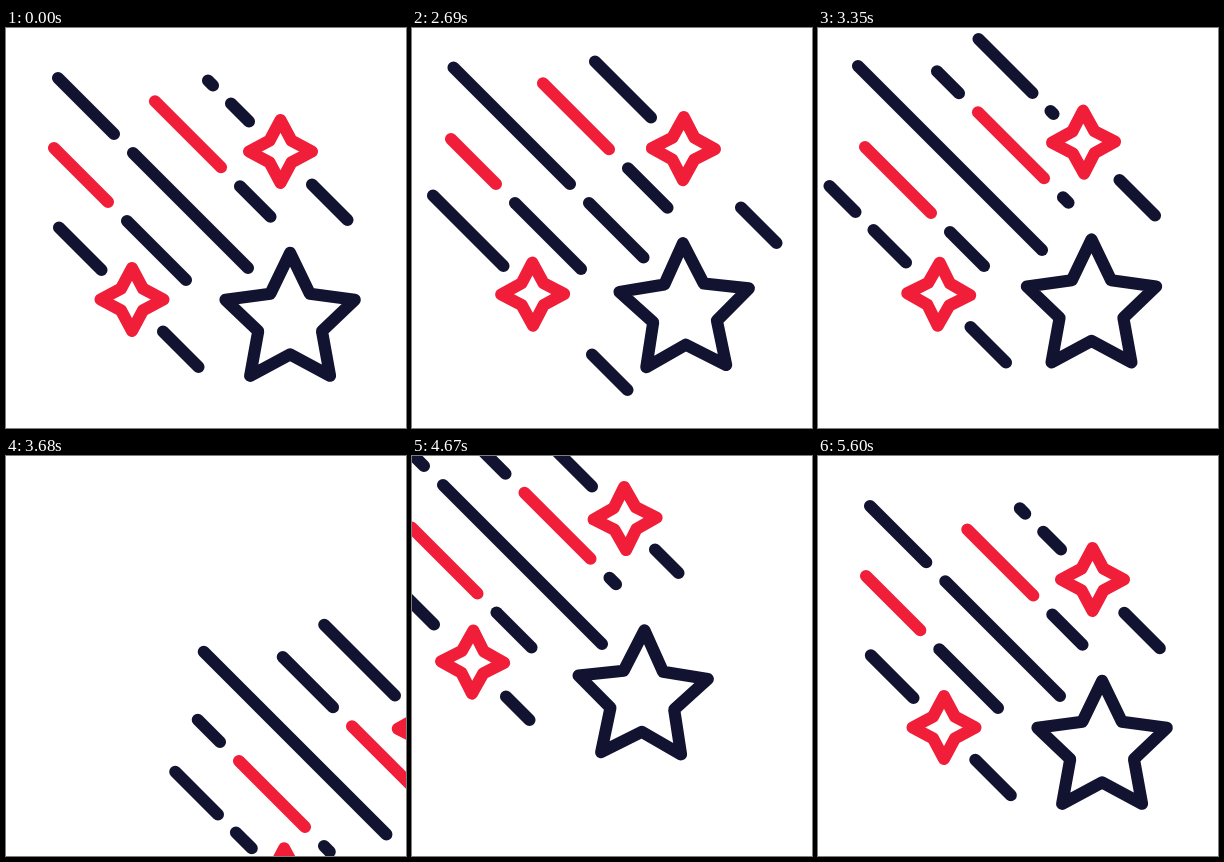
Write an HTML page that moves like this. It is 400 px wide and 400 px high and loops after 5630 ms.

```html
<!DOCTYPE html>
<html lang="en">
<head>
<meta charset="utf-8">
<title>Shooting stars</title>
<style>
  html, body { margin: 0; width: 100%; height: 100%; overflow: hidden; background: #fff; }
  svg { display: block; width: 100vw; height: 100vh; }
  path { fill: none; stroke-width: 12.1; stroke-linecap: round; stroke-linejoin: round; }
</style>
</head>
<body>
<svg viewBox="0 0 400 400" id="stage"></svg>
<script>
const LOOP = 5630, START = 2030, STEP = 30;
const DARK = '#121331', RED = '#f01e38';
const stage = document.getElementById('stage');

function addPath(color, d = '') {
  const el = document.createElementNS('http://www.w3.org/2000/svg', 'path');
  el.setAttribute('stroke', color);
  el.setAttribute('d', d);
  stage.appendChild(el);
  return el;
}

// Closed star around the origin, given as alternating radii
function starPath(points, outer, inner) {
  let d = '';
  for (let i = 0; i < points * 2; i++) {
    const a = i * Math.PI / points - Math.PI / 2;
    const r = i % 2 ? inner : outer;
    d += (i ? 'L' : 'M') + (r * Math.cos(a)).toFixed(2) + ' ' + (r * Math.sin(a)).toFixed(2);
  }
  return d + 'Z';
}

// Smooth monotone curve through [time, value] keys, flat at both ends
function curve(keys, t) {
  const n = keys.length - 1;
  if (t <= keys[0][0]) return keys[0][1];
  if (t >= keys[n][0]) return keys[n][1];
  const slope = i => (keys[i + 1][1] - keys[i][1]) / (keys[i + 1][0] - keys[i][0]);
  const tangent = i => {
    if (i === 0 || i === n) return 0;
    const a = slope(i - 1), b = slope(i);
    return a * b <= 0 ? 0 : 2 * a * b / (a + b);
  };
  let i = 0;
  while (t > keys[i + 1][0]) i++;
  const h = keys[i + 1][0] - keys[i][0], u = (t - keys[i][0]) / h;
  const u2 = u * u, u3 = u2 * u;
  return keys[i][1] * (2 * u3 - 3 * u2 + 1) + keys[i + 1][1] * (3 * u2 - 2 * u3)
    + h * (tangent(i) * (u3 - 2 * u2 + u) + tangent(i + 1) * (u3 - u2));
}

// Diagonal travel: drift back, shoot out, return from the top left corner
function travel(mid, back, entry, t) {
  const OUT = 3350, JUMP = 3800;
  if (t < START) return 0;
  if (t < OUT) return curve([[START, 0], [2690, mid], [OUT, back]], t);
  if (t < JUMP) return back + 400 * ((t - OUT) / (JUMP - OUT)) ** 3;
  return -entry * ((LOOP - t) / 960) ** 3;
}

const flows = {
  mid: [[START, 0], [2690, 148.5], [3350, 499], [4160, 973], [4670, 1089], [LOOP, 1254]],
  near: [[START, 0], [2690, 179], [3350, 485], [4670, 996], [LOOP, 1190]],
  tail: [[START, 0], [2690, 38], [3350, 401], [4670, 1089], [LOOP, 1248]],
  front: [[START, 0], [2690, 77], [3350, 413], [4670, 1052], [LOOP, 1248]]
};
const stretch = [[START, 0], [2690, 28], [3350, 34], [4800, 34], [LOOP, 0]];

const groups = {
  main: t => travel(-10.5, -12, 52, t),
  near: t => travel(-9, -14, 60.5, t),
  far: t => travel(-4, -7.5, 63, t)
};

// A lane lies on x - y = c and shows dashes between from and to
const lanes = [
  { c: 149.5, group: 'far', flow: 'tail', from: 202, to: 243, first: 225, dash: 86, period: 104, grow: true },
  { c: 149.5, group: 'far', flow: 'front', from: 306, to: 397, first: 306, dash: 35.5, period: 104 },
  { c: 75.8, group: 'near', flow: 'near', from: 133, to: 264.5, first: 149, dash: 66, period: 170, red: true },
  { c: 75.8, group: 'near', flow: 'near', from: 133, to: 264.5, first: 234, dash: 66, period: 170 },
  { c: 2, group: 'main', flow: 'mid', from: 52, to: 242, first: 127, dash: 190, period: 209 },
  { c: -72, group: 'near', flow: 'near', from: 48, to: 180, first: 36, dash: 66, period: 170, red: true },
  { c: -72, group: 'near', flow: 'near', from: 48, to: 180, first: 121, dash: 66, period: 170 },
  { c: -146.5, group: 'far', flow: 'tail', from: 53, to: 95.5, first: 48, dash: 86, period: 104, grow: true },
  { c: -146.5, group: 'far', flow: 'front', from: 157, to: 248, first: 157, dash: 35.5, period: 104 }
];
lanes.forEach(l => { l.el = addPath(l.red ? RED : DARK); });

// amp, phase and rate shake the angle; dx, dy shake the place
const small = starPath(4, 31.5, 15.5);
const stars = [
  { el: addPath(DARK, starPath(5, 68, 33.5)), x: 284.1, y: 292.8, group: 'main',
    amp: 1.8, phase: -120, rate: 68.18, dx: -1.5, dy: 1.5 },
  { el: addPath(RED, small), x: 274.5, y: 123.5, group: 'far',
    amp: 2, phase: 112, rate: 67.59, dx: 1.6, dy: 2 },
  { el: addPath(RED, small), x: 126, y: 271.5, group: 'far',
    amp: 2, phase: -155, rate: 71.73, dx: -2.4, dy: -2.4 }
];

function lanePath(l, t, shift) {
  const from = l.from - (l.grow ? curve(stretch, t) : 0);
  let s = l.first - curve(flows[l.flow], t);
  s += Math.ceil((from - l.dash - s) / l.period) * l.period;
  let d = '';
  for (; s < l.to; s += l.period) {
    const a = Math.max(s, from), b = Math.min(s + l.dash, l.to);
    if (b - a < 0.5) continue;
    const x1 = a + shift, x2 = b + shift;
    d += `M${x1.toFixed(2)} ${(x1 - l.c).toFixed(2)}L${x2.toFixed(2)} ${(x2 - l.c).toFixed(2)}`;
  }
  return d;
}

const wave = deg => Math.sin(deg * Math.PI / 180);

function draw(time) {
  const frame = Math.floor((time - START) / STEP);
  const t = frame < 0 ? 0 : START + frame * STEP;
  const shake = frame < 0 ? 0 : Math.max(0, Math.min(1, (5600 - t) / 200));
  const sway = shake * wave(45 + frame * 70.05);
  const shift = {};
  for (const g in groups) shift[g] = groups[g](t);

  lanes.forEach(l => l.el.setAttribute('d', lanePath(l, t, shift[l.group])));
  stars.forEach(s => {
    const rot = shake * s.amp * wave(s.phase + frame * s.rate);
    const x = s.x + shift[s.group] + sway * s.dx;
    const y = s.y + shift[s.group] + sway * s.dy;
    s.el.setAttribute('transform', `translate(${x.toFixed(2)} ${y.toFixed(2)}) rotate(${rot.toFixed(2)})`);
  });
}

const begin = performance.now();
function tick() {
  draw((performance.now() - begin) % LOOP);
  requestAnimationFrame(tick);
}
tick();
</script>
</body>
</html>
```
